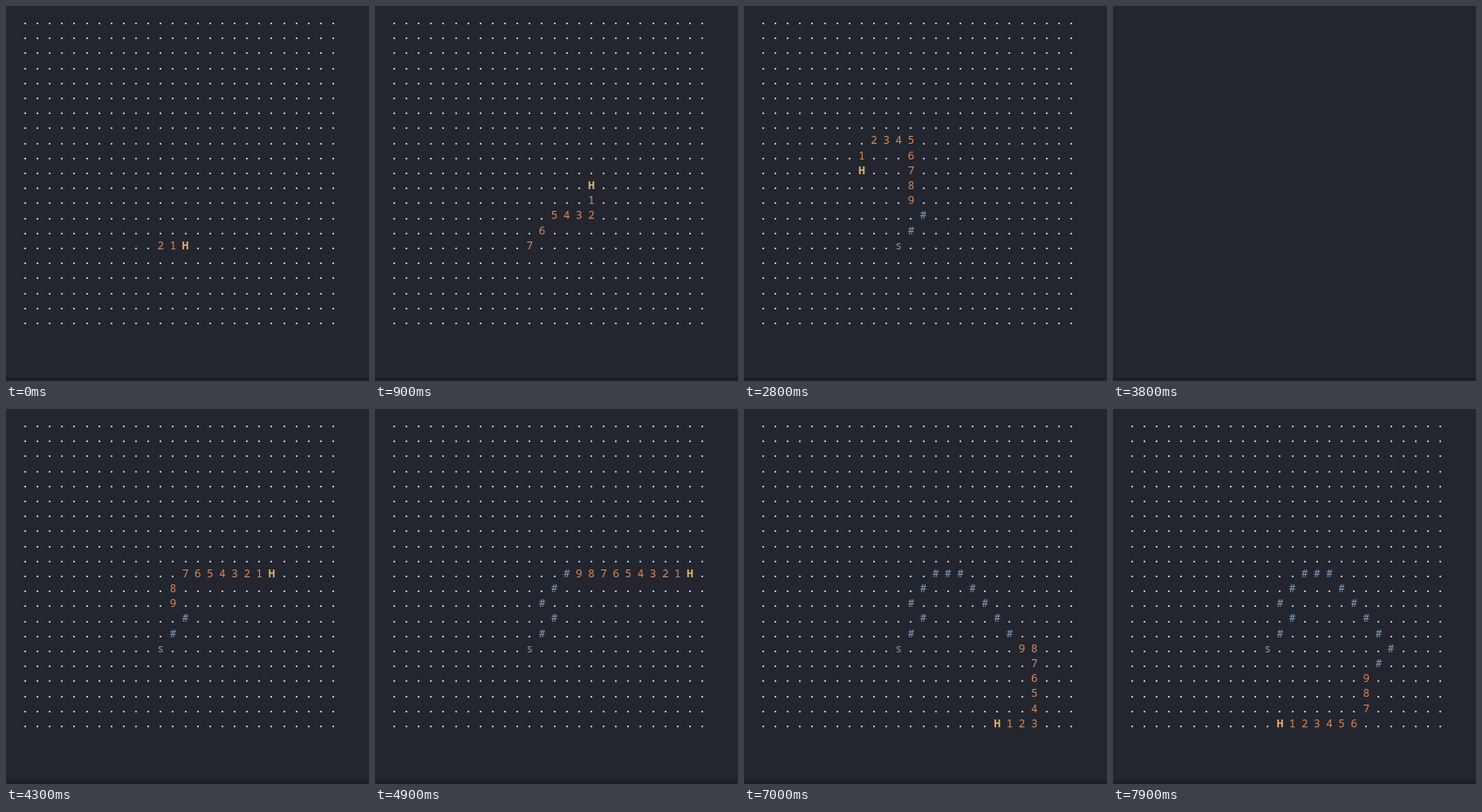
An HTML page with a canvas for the animation above (8 s loop, 416 by 430 pixels).

```html
<!DOCTYPE html>
<html lang="en">
<head>
<meta charset="utf-8">
<title>Rope simulation</title>
<style>
  html, body { margin: 0; width: 100%; height: 100%; overflow: hidden; background: #23262e; }
  canvas { display: block; width: 416px; height: 430px; }
</style>
</head>
<body>
<canvas id="stage" width="416" height="430"></canvas>
<script>
const ctx = document.getElementById('stage').getContext('2d');

const COLS = 26, ROWS = 21, KNOTS = 10;
const START = { x: 11, y: 15 };
const MOVES = 'R5 U8 L8 D3 R17 D10 L25';
const DIRECTIONS = { R: [1, 0], L: [-1, 0], U: [0, -1], D: [0, 1] };

const LOOP = 8000, TICK = 100, STEP = 128;
const FIRST_STEP = 2, STEP_PHASE = 0.54, CLEARED_AT = 3800;

const COLORS = {
  background: '#23262e', edge: '#1e2026', dot: '#b4b8c0',
  head: '#e2b06c', knot: '#dc8a59', trail: '#7d9fc2', start: '#969aa0'
};

// Each knot closes in on the one ahead once they no longer touch.
function follow(rope) {
  for (let i = 1; i < rope.length; i++) {
    const dx = rope[i - 1].x - rope[i].x, dy = rope[i - 1].y - rope[i].y;
    if (Math.max(Math.abs(dx), Math.abs(dy)) < 2) return;
    rope[i].x += Math.sign(dx);
    rope[i].y += Math.sign(dy);
  }
}

function simulate() {
  const rope = Array.from({ length: KNOTS }, () => ({ ...START }));
  const trail = [];
  const states = [];
  const record = () => {
    trail.push({ ...rope[KNOTS - 1] });
    states.push({ rope: rope.map(k => ({ ...k })), trail: trail.slice() });
  };
  record();
  for (const move of MOVES.split(' ')) {
    const [dx, dy] = DIRECTIONS[move[0]];
    for (let n = +move.slice(1); n > 0; n--) {
      rope[0].x += dx;
      rope[0].y += dy;
      follow(rope);
      record();
    }
  }
  return states;
}

const states = simulate();

// Later marks cover earlier ones, so the head is set last.
function marksFor({ rope, trail }) {
  const marks = new Map();
  const put = (p, text, color) => marks.set(p.y * COLS + p.x, { text, color });
  trail.forEach(p => put(p, '#', COLORS.trail));
  put(START, 's', COLORS.start);
  for (let i = KNOTS - 1; i > 0; i--) put(rope[i], String(i), COLORS.knot);
  put(rope[0], 'H', COLORS.head);
  return marks;
}

function drawGrid(state) {
  const marks = marksFor(state);
  ctx.textAlign = 'center';
  for (let row = 0; row < ROWS; row++) {
    for (let col = 0; col < COLS; col++) {
      const x = 22 + col * 14.12, y = 20 + row * 17.2;
      const mark = marks.get(row * COLS + col);
      if (mark) {
        const weight = mark.text === 'H' ? 'bold' : 'normal';
        ctx.font = `${weight} 12.5px "Noto Sans Mono", "DejaVu Sans Mono", monospace`;
        ctx.fillStyle = mark.color;
        ctx.fillText(mark.text, x, Math.round(y + 0.8));
      } else {
        ctx.fillStyle = COLORS.dot;
        ctx.fillRect(Math.round(x - 1), Math.round(y - 1), 2, 2);
      }
    }
  }
}

function render(time) {
  const tick = Math.floor(time / TICK) * TICK;
  ctx.fillStyle = COLORS.background;
  ctx.fillRect(0, 0, 416, 430);
  ctx.fillStyle = COLORS.edge;
  ctx.fillRect(0, 426, 416, 4);
  if (tick !== CLEARED_AT) {
    drawGrid(states[FIRST_STEP + Math.floor(tick / STEP + STEP_PHASE)]);
  }
}

const begin = performance.now();
function frame() {
  render((performance.now() - begin) % LOOP);
  requestAnimationFrame(frame);
}
frame();
</script>
</body>
</html>
```
